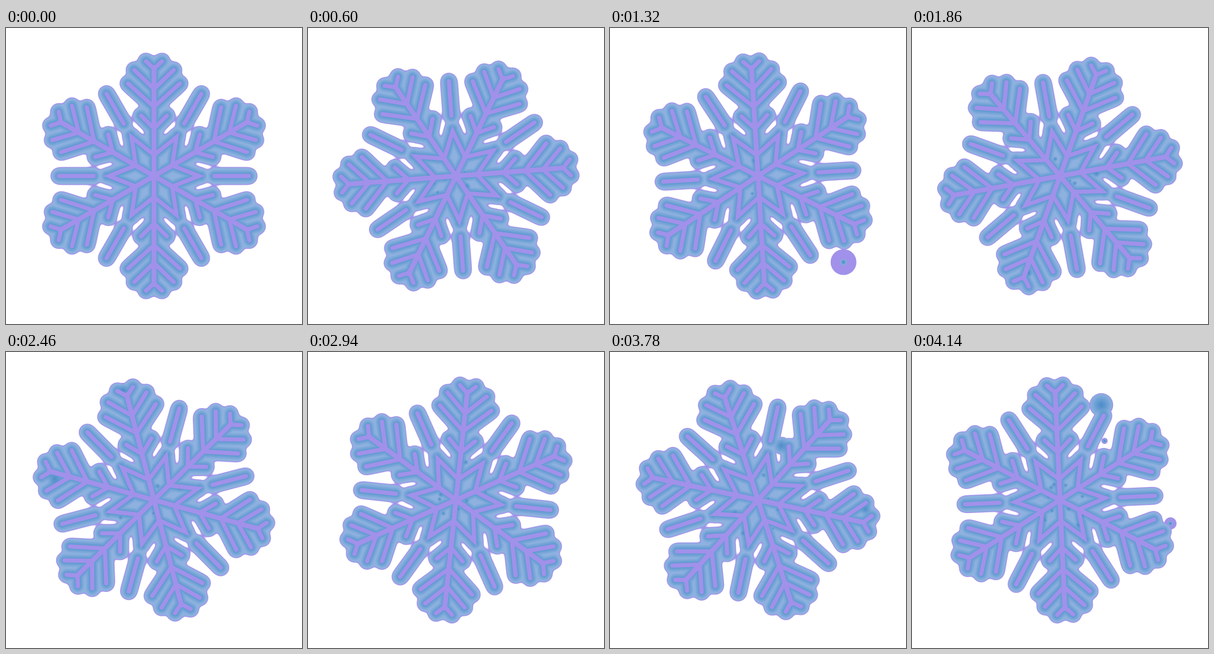
An HTML page for the animation above (4200 ms loop, 480x480 px).

```html
<!DOCTYPE html>
<html lang="en">
<head>
<meta charset="utf-8">
<title>Snowflake</title>
<style>
html, body { margin: 0; width: 100%; height: 100%; overflow: hidden; background: #fff; }
svg { display: block; width: 100vw; height: 100vh; }
</style>
</head>
<body>
<svg id="stage" viewBox="-240 -240 480 480"></svg>
<script>
const LOOP = 4200, STEP = 60, TURN = 180;
const PURPLE = '#a191ea', NEAR = [96, 154, 209], FAR = [142, 177, 223];
const RAD = Math.PI / 180;
const STAR_TIP = 73, STAR_VALLEY = 34;
const stage = document.getElementById('stage');

function add(parent, tag, attrs = {}) {
  const node = document.createElementNS('http://www.w3.org/2000/svg', tag);
  for (const key in attrs) node.setAttribute(key, attrs[key]);
  parent.appendChild(node);
  return node;
}

function rotate([x, y], deg) {
  const c = Math.cos(deg * RAD), s = Math.sin(deg * RAD);
  return [(x * c - y * s).toFixed(2), (x * s + y * c).toFixed(2)];
}

const mix = t => `rgb(${NEAR.map((n, i) => Math.round(n + (FAR[i] - n) * t))})`;

// Repeats a list of line segments around the six axes.
function sixfold(segments) {
  let d = '';
  for (let deg = 0; deg < 360; deg += 60)
    for (const ends of segments) d += 'M' + ends.map(p => rotate(p, deg)).join('L');
  return d;
}

// Base height, tip half-width, tip height of each branch pair.
const branches = [[77, 21, 98], [112, 42, 150], [141, 32, 172], [174, 13, 186]];
const twigs = [[[98, 0], [154, 0]]];
for (const [base, x, y] of branches)
  for (const side of [-x, x]) twigs.push([[0, -base], [side, -y]]);

const valley = [0, -STAR_VALLEY], tip = rotate([0, -STAR_TIP], 30);
const starSides = [30, -30].map(deg => [valley, rotate([0, -STAR_TIP], deg)]);
const starPoint = [tip, rotate([0, -STAR_TIP - 3], 30)];
const starCorners = [];
for (let deg = 0; deg < 360; deg += 60) starCorners.push(rotate(valley, deg), rotate(tip, deg));

const spinePath = sixfold([[[0, 0], [0, -176]]]);
const twigPath = sixfold(twigs);
const starPath = 'M' + starCorners.join('L') + 'Z';
const wholePath = spinePath + twigPath + sixfold([...starSides, starPoint]);

const defs = add(stage, 'defs');
function gradient(id, stops) {
  const g = add(defs, 'radialGradient', { id });
  for (const [offset, color, opacity] of stops)
    add(g, 'stop', { offset, 'stop-color': color, 'stop-opacity': opacity });
}
gradient('puff', [[0, mix(0.35), 1], [0.65, mix(0.9), 1], [1, mix(1), 1]]);
gradient('shade', [[0, '#4888c6', 0.9], [0.45, '#5694cc', 0.6], [1, '#6aa0d4', 0]]);

// Blur and threshold: neighbouring shapes melt together.
function meltFilter(id, color, level) {
  const filter = add(defs, 'filter', {
    id, filterUnits: 'userSpaceOnUse', x: -240, y: -240, width: 480, height: 480,
    'color-interpolation-filters': 'sRGB'
  });
  add(filter, 'feGaussianBlur', { stdDeviation: 4 });
  const transfer = add(filter, 'feComponentTransfer', { result: 'shape' });
  add(transfer, 'feFuncA', { type: 'linear', slope: 13, intercept: 0.5 - 13 * level });
  add(filter, 'feFlood', { 'flood-color': color });
  add(filter, 'feComposite', { operator: 'in', in2: 'shape' });
}
meltFilter('rim', PURPLE, 0.215);
meltFilter('fill', mix(1), 0.315);

const spinners = [];
function layer(parent = stage) {
  const g = add(parent, 'g', { fill: 'none', 'stroke-linecap': 'round' });
  spinners.push(g);
  return g;
}
function outline(parent, d, radius, stroke) {
  add(parent, 'path', { d, stroke, 'stroke-width': 2 * radius });
}
function melted(id) {
  outline(layer(add(stage, 'g', { filter: `url(#${id})` })), wholePath, 11.2, '#000');
}

melted('rim');
const rims = add(stage, 'g', { fill: PURPLE });
melted('fill');
const puffs = add(stage, 'g', { fill: 'url(#puff)' });
const halo = layer();
for (let r = 12; r >= 4; r -= 0.5) outline(halo, wholePath, r, mix(Math.min(1, (r - 4) / 7)));
const shades = add(stage, 'g', { fill: 'url(#shade)' });
const core = layer();
outline(core, spinePath, 4, PURPLE);
outline(core, twigPath + starPath, 3.4, PURPLE);

let seed = 11;
function random(min, max) {
  seed = (seed * 16807) % 2147483647;
  return min + (max - min) * seed / 2147483647;
}

// Angle, birth, death, speed in px/ms, final radius.
const flakes = [
  [45.2, 500, 1380, 0.24, 21.7],
  [108, 1200, 2060, 0.25, 10],
  [-105.7, 1750, 2690, 0.26, 14],
  [192, 1850, 2800, 0.27, 18],
  [5, 3050, 4080, 0.24, 13],
  [-66.5, 3300, 4500, 0.2, 23],
  [-53, 3500, 4300, 0.1875, 5.6],
  [12, 3300, 4250, 0.218, 10.6]
];
for (let i = 0; i < 80; i++) {
  const birth = random(60, 4100);
  flakes.push([random(0, 360), birth, birth + random(450, 900), random(0.03, 0.13), random(4, 10)]);
}

const particles = flakes.map(([angle, birth, death, speed, size]) => ({
  angle, birth, death, speed, size,
  rim: add(rims, 'circle'), puff: add(puffs, 'circle'), shade: add(shades, 'circle')
}));

function place(node, x, y, r) {
  node.setAttribute('cx', x);
  node.setAttribute('cy', y);
  node.setAttribute('r', Math.max(0, r));
}

function draw(time) {
  const t = Math.floor((time % LOOP) / STEP) * STEP;
  for (const g of spinners) g.setAttribute('transform', `rotate(${TURN * t / LOOP})`);
  for (const p of particles) {
    const age = t - p.birth, u = age / (p.death - p.birth);
    const alive = u > 0 && u < 1;
    const [x, y] = rotate([alive ? age * p.speed : 0, 0], p.angle);
    const r = alive ? p.size * Math.sqrt(u) : 0;
    const strength = Math.min(1, 4 * (1 - u));
    place(p.rim, x, y, r);
    place(p.puff, x, y, (r - 1.3) * strength);
    place(p.shade, x, y, r * strength);
  }
}

const start = performance.now();
function tick() {
  draw(performance.now() - start);
  requestAnimationFrame(tick);
}
tick();
</script>
</body>
</html>
```
